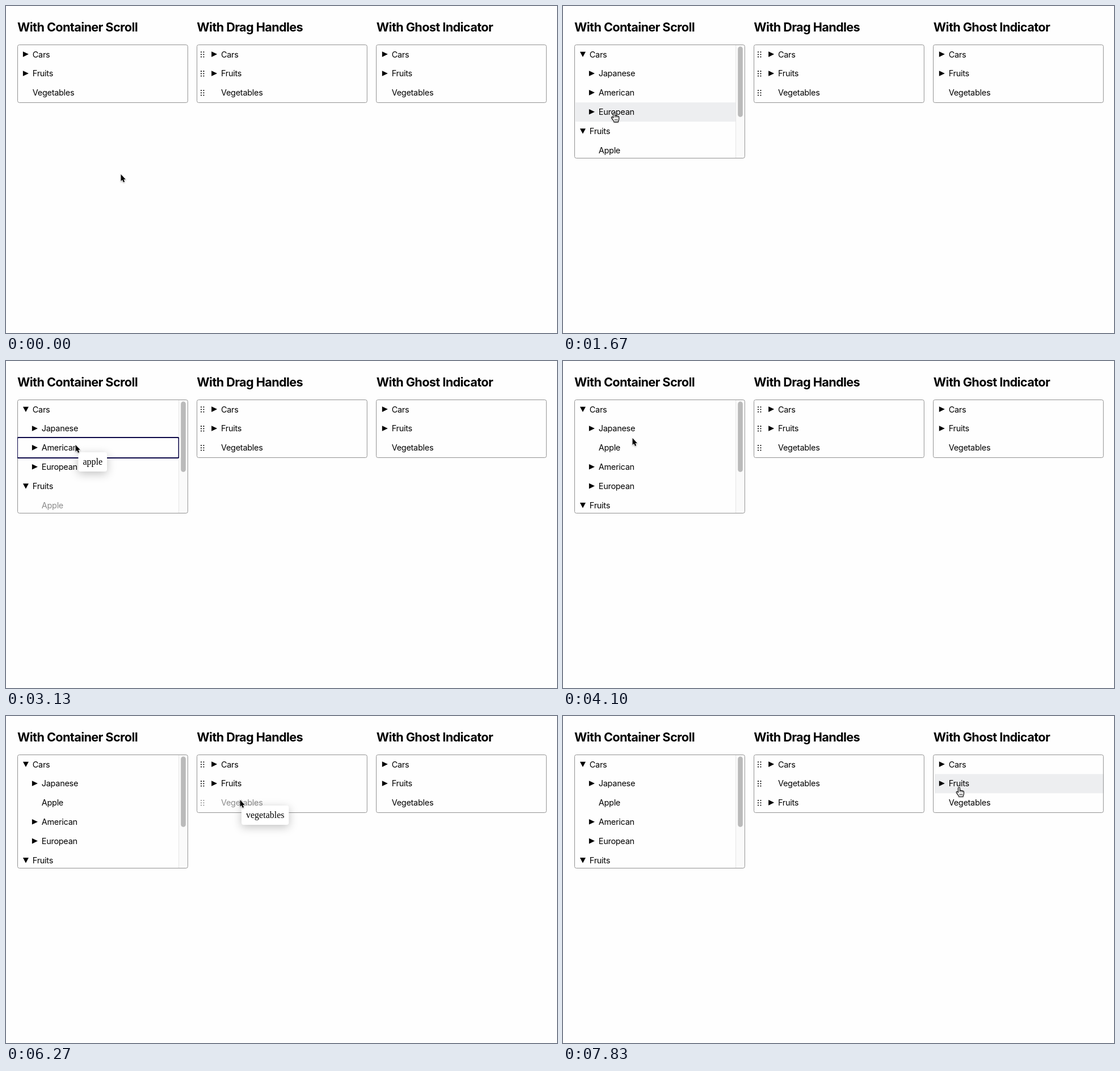
An HTML page that plays this animation: 971 px wide and 577 px high, repeating every 8 s.

```html
<!DOCTYPE html>
<html lang="en">
<head>
<meta charset="utf-8">
<title>Tree drag and drop</title>
<style>
  html, body { margin: 0; width: 100%; height: 100%; overflow: hidden; background: #fefefe; }
  svg { display: block; }
  text { font: 14.4px Inter, "Noto Sans", sans-serif; letter-spacing: -.24px; white-space: pre; }
  .title { font-weight: 700; font-size: 21.6px; letter-spacing: -.58px; }
  .tip text { font: 16px "Liberation Serif", serif; letter-spacing: 0; }
  .tip rect { fill: #fff; filter: drop-shadow(0 4px 8px rgba(0, 0, 0, .24)); }
  .mark { fill: none; stroke: #0c0848; stroke-width: 2; }
  .pointer { filter: drop-shadow(0 1px 1px rgba(0, 0, 0, .3)); }
</style>
</head>
<body>
<svg id="stage" width="971" height="577" viewBox="0 0 971 577"></svg>
<script>
const LOOP = 8000, TOP = 68.6, ROW = 33.87, WIDTH = 300;
const stage = document.getElementById("stage");

// Pointer path: time, x, y
const PATH = [
  [0, 202, 296], [30, 202, 296], [670, 34.5, 120.5], [970, 34.5, 120.5],
  [1240, 35, 88], [1340, 35, 88], [1900, 122, 246], [1960, 122, 246],
  [2230, 122, 213], [2530, 122, 153], [2830, 122, 153], [3600, 122, 135],
  [4430, 122, 135], [4950, 325, 166], [5130, 342.5, 153], [5250, 342.5, 153],
  [5270, 344, 154], [5450, 344, 154], [5600, 385, 143], [6270, 412, 147],
  [6300, 412, 147], [6800, 416, 104], [7050, 416, 104], [7500, 600, 158],
  [7830, 698, 126], [8000, 698, 126]
];

const DRAGS = [
  { from: 1990, to: 4100, col: 0, name: "Apple", dx: 5.4, dy: 14, tip: 50.6 },
  { from: 5470, to: 7030, col: 1, name: "Vegetables", dx: 3, dy: 11, tip: 83.4 }
];
const FLASHES = [
  { from: 4130, to: 4430, col: 0, name: "Apple" },
  { from: 7030, to: 7330, col: 1, name: "Vegetables" }
];
// Hovering pauses from the start of a drag until the pointer moves again
const QUIET = [[1990, 4450], [5470, 7090]];

const within = (t, a, b) => t >= a && t < b;
const rowTop = i => TOP + ROW * i;
const crisp = v => Math.floor(v) + .5;

function slope(i, k) {
  const a = PATH[i - 1], p = PATH[i], b = PATH[i + 1];
  if (!a || !b) return 0;
  const still = q => q[1] === p[1] && q[2] === p[2];
  return still(a) || still(b) ? 0 : (b[k] - a[k]) / (b[0] - a[0]);
}

function pointerAt(t) {
  let i = PATH.findIndex(p => p[0] > t) - 1;
  if (i < 0) i = PATH.length - 2;
  const a = PATH[i], b = PATH[i + 1], d = b[0] - a[0], u = (t - a[0]) / d;
  const s = u * u * (3 - 2 * u);
  const axis = k => a[k] + (b[k] - a[k]) * s
    + slope(i, k) * d * u * (1 - u) ** 2 - slope(i + 1, k) * d * u * u * (1 - u);
  return { x: axis(1), y: axis(2) };
}

// Row kinds: ">" closed folder, "v" open folder, "" leaf
const node = (name, kind = "", depth = 0) => ({ name, kind, depth });

function columnsAt(t) {
  const fruits = t >= 900, cars = t >= 1300, apple = t >= 4100;
  const leaf = name => node(name, "", 1);
  const make = name => node(name, ">", 1);
  const first = [node("Cars", cars ? "v" : ">")];
  if (cars) {
    first.push(make("Japanese"));
    if (apple) first.push(leaf("Apple"));
    first.push(make("American"), make("European"));
  }
  first.push(node("Fruits", fruits ? "v" : ">"));
  if (fruits) {
    if (!apple) first.push(leaf("Apple"));
    first.push(leaf("Banana"), leaf("Grapes"));
  }
  first.push(node("Vegetables"));

  const plain = () => [node("Cars", ">"), node("Fruits", ">"), node("Vegetables")];
  const second = plain();
  if (t >= 7030) second.splice(1, 0, second.pop());
  return [
    { x: 20, title: "With Container Scroll", label: 46.8, rows: first },
    { x: 336.3, title: "With Drag Handles", label: 379, rows: second, handles: true },
    { x: 652.8, title: "With Ghost Indicator", label: 679.7, rows: plain() }
  ].map(c => {
    const full = c.rows.length * ROW + 1;
    const height = Math.min(full, 200);
    const scroll = full > 200;
    return { ...c, full, height, scroll, right: c.x + (scroll ? 284.5 : WIDTH) };
  });
}

function arrow(x, y, open) {
  return open
    ? `<path d="M${x} ${y - 4.6}h10l-5 9.4z"/>`
    : `<path d="M${x} ${y - 5}l10 4.8l-10 4.8z"/>`;
}

function handle(x, y) {
  let dots = "";
  for (let i = 0; i < 6; i++)
    dots += `<circle cx="${x + (i % 2) * 4.4}" cy="${y + ((i >> 1) - 1) * 4.2}" r="1.05"/>`;
  return dots;
}

function rowSvg(col, row, i, look) {
  const y = rowTop(i), mid = y + 16.7, x = col.label + row.depth * 16;
  let out = "";
  if (look.flash)
    out += `<rect x="${col.x + .7}" y="${y}" width="${col.right - col.x - .7}" height="${ROW}" rx="3" fill="#8888ff"/>`;
  else if (look.hover)
    out += `<rect x="${col.x + 2}" y="${y}" width="${col.right - col.x - 2}" height="${ROW}" fill="#edeef0"/>`;
  out += `<g opacity="${look.dim ? .45 : 1}">`;
  if (col.handles) out += handle(344, mid + .2);
  if (row.kind) out += arrow(x - 16.9, mid, row.kind === "v");
  return out + `<text x="${x}" y="${mid + 5.3}">${row.name}</text></g>`;
}

function dropMark(col, drag, p) {
  const i = Math.floor((p.y - TOP) / ROW), row = col.rows[i];
  if (!row || row.name === drag.name) return "";
  const part = (p.y - rowTop(i)) / ROW;
  if (part > .22 && part < .78) {
    // The ring lies outside the row, so its sides are half clipped
    const y = Math.round(rowTop(i) - 1), end = Math.round(rowTop(i + 1) + 1);
    return `<rect class="mark" x="${col.x}" y="${y}" width="${col.right - col.x}" height="${end - y}" rx="2"/>`;
  }
  const y = Math.round(rowTop(part < .5 ? i : i + 1));
  return `<path class="mark" d="M${col.x + 1 + row.depth * 16} ${y}H${col.right}"/>`;
}

function scrollbar(col) {
  const size = 194 * col.height / col.full - 2.5;
  return `<rect x="304.5" y="69" width="15" height="199" fill="#fafafa"/>
    <path d="M304.5 69V268" stroke="#e6e6e6"/>
    <rect x="308.2" y="71.5" width="8.6" height="${size}" rx="4.3" fill="#bababa"/>`;
}

function columnSvg(col, n, t, p, hover, drag) {
  const flash = FLASHES.find(f => f.col === n && within(t, f.from, f.to));
  const bottom = TOP + col.height;
  const rows = col.rows.map((row, i) => rowTop(i) > bottom ? "" : rowSvg(col, row, i, {
    flash: flash && flash.name === row.name,
    hover: hover && hover.col === n && hover.row === i,
    dim: drag && drag.col === n && drag.name === row.name
  })).join("");
  return `<text class="title" x="${col.x}" y="45">${col.title}</text>
    <clipPath id="clip${n}"><rect x="${col.x}" y="68" width="${WIDTH + 1}" height="${col.height + 1}"/></clipPath>
    <clipPath id="marks${n}"><rect x="${col.x}" y="68" width="${col.right - col.x + .5}" height="${col.height + 1}"/></clipPath>
    <g clip-path="url(#clip${n})">${rows}${col.scroll ? scrollbar(col) : ""}</g>
    <rect x="${crisp(col.x)}" y="68.5" width="${WIDTH - .2}" height="${Math.floor(col.height)}" rx="3" fill="none" stroke="#929292"/>
    ${drag && drag.col === n ? `<g clip-path="url(#marks${n})">${dropMark(col, drag, p)}</g>` : ""}`;
}

function hoverAt(t, p, cols) {
  if (QUIET.some(q => within(t, ...q))) return null;
  const col = cols.findIndex(c => p.x > c.x && p.x < c.right);
  if (col < 0 || p.y < TOP || p.y > TOP + cols[col].height) return null;
  return { col, row: Math.floor((p.y - TOP) / ROW) };
}

function pointerSvg(p, hand) {
  const shape = hand
    ? `<path d="M-1.5 9V1.2a1.4 1.4 0 0 1 2.8 0V6a1.3 1.3 0 0 1 2.5 .2a1.3 1.3 0 0 1 2.4 .5a1.2 1.2 0 0 1 2.1 .9
        V10.5C8.3 13 7 13.5 7 16.3H-.3C-.4 13.5-3.2 12-4.7 9C-5.3 7.6-3.6 6.8-2.7 7.8z" fill="#fff" stroke="#000" stroke-width="1.1" stroke-linejoin="round"/>
       <path d="M1.3 6v2.6M3.8 6.4v2.4M6.2 7v2M1.3 11v3M3.3 11v3M5.3 11v3" fill="none" stroke="#000" stroke-width=".8"/>`
    : `<path d="M.5 1V13L3.1 10.7L5 15L7.1 14.1L5.3 9.9H8.8z" stroke="#fff" stroke-width="1.3" paint-order="stroke"/>`;
  return `<g class="pointer" transform="translate(${p.x} ${p.y})">${shape}</g>`;
}

function tipSvg(drag, p) {
  return `<g class="tip" transform="translate(${p.x + drag.dx} ${p.y + drag.dy})">
    <rect width="${drag.tip}" height="34" rx="4"/>
    <text x="8" y="22">${drag.name.toLowerCase()}</text></g>`;
}

function draw(t) {
  const p = pointerAt(t), cols = columnsAt(t);
  const drag = DRAGS.find(d => within(t, d.from, d.to));
  const hover = hoverAt(t, p, cols);
  stage.innerHTML = cols.map((c, n) => columnSvg(c, n, t, p, hover, drag)).join("")
    + (drag ? tipSvg(drag, p) : "") + pointerSvg(p, hover);
}

const start = performance.now();
function tick() {
  draw((performance.now() - start) % LOOP);
  requestAnimationFrame(tick);
}
tick();
</script>
</body>
</html>
```
